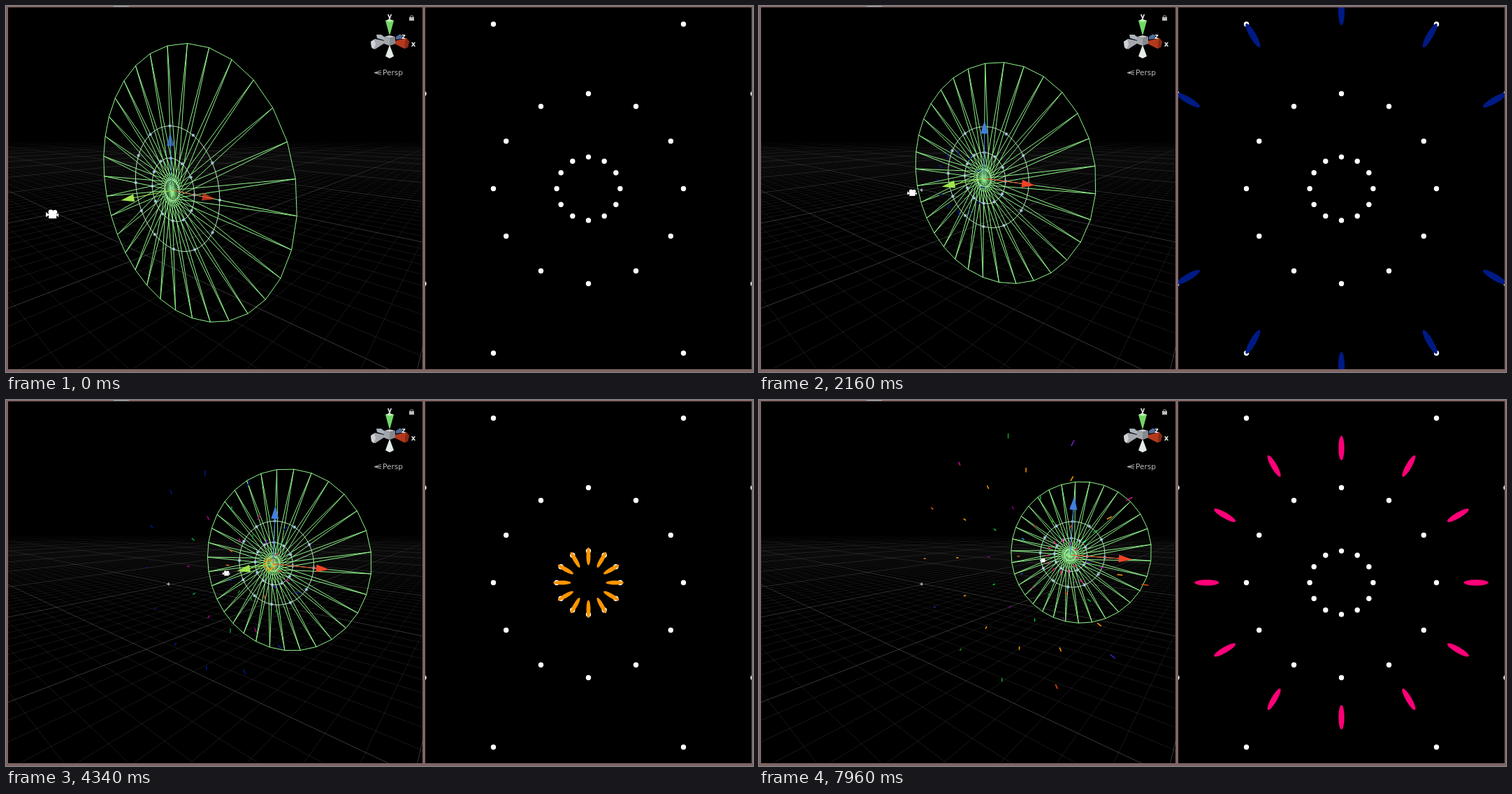
An HTML page with a canvas that plays this animation: 1069 by 524 pixels, repeating every 8000 ms.

```html
<!DOCTYPE html>
<html>
<head>
<meta charset="utf-8">
<style>
html, body { margin: 0; width: 100%; height: 100%; overflow: hidden; background: #000; }
canvas { display: block; }
</style>
</head>
<body>
<canvas id="stage" width="1069" height="524"></canvas>
<script>
const TAU = Math.PI * 2, LOOP = 8000;
const UNIT = 0.0374;          // one grid cell; the camera stands at distance 1 from the origin
const SPEED = 1.572e-4;       // depth travelled by the wheel per ms
const FOCAL = 415, YAW = 41.2 * Math.PI / 180, PITCH = 11.5 * Math.PI / 180;
const sinY = Math.sin(YAW), cosY = Math.cos(YAW), sinP = Math.sin(PITCH), cosP = Math.cos(PITCH);

const canvas = document.getElementById('stage');
const background = document.createElement('canvas');
background.width = canvas.width;
background.height = canvas.height;
let ctx;

// Bursts of twelve petals, one about every second; colours repeat around the ring.
const FIRST_BURST = 1090, BURST_GAP = 1004, BURST_LIFE = 5;
const BURSTS = [
  ['#001a85'],
  ['#a8007a', '#00a042'],
  ['#d85a10', '#e01890', '#7a20d0', '#14a020', '#d0109a', '#e05a10', '#f07010', '#2030c0', '#128a28', '#18a020', '#e85010', '#5020d0'],
  ['#ff9600'],
  ['#86008c', '#00c038'],
  ['#5a0cbc', '#1eff86', '#c84c0a', '#24c80a', '#b01024', '#00a8c8', '#cd6e00', '#184898', '#cd007a', '#0f8228', '#ff1a00', '#ff00b8'],
  ['#ff0078']
];

// World to screen: x right and nearer, y up, z away along the travel.
function project(x, y, z) {
  const h = z * cosY - x * sinY;
  const w = 1 + h * cosP - y * sinP;
  const right = -0.151 + x * cosY + z * sinY;
  const up = -0.0065 + y * cosP + h * sinP;
  return [300 + FOCAL * right / w, 261 - FOCAL * up / w, w];
}

const onRing = (radius, angle, z) => project(radius * Math.cos(angle), radius * Math.sin(angle), z);

function line(a, b) {
  ctx.moveTo(a[0], a[1]);
  ctx.lineTo(b[0], b[1]);
}

function stroke(color, width, build) {
  ctx.strokeStyle = color;
  ctx.lineWidth = width;
  ctx.beginPath();
  build();
  ctx.stroke();
}

function poly(color, ...points) {
  ctx.fillStyle = color;
  ctx.beginPath();
  points.forEach(p => ctx.lineTo(p[0], p[1]));
  ctx.fill();
}

function disc(color, x, y, radius) {
  ctx.fillStyle = color;
  ctx.beginPath();
  ctx.arc(x, y, radius, 0, TAU);
  ctx.fill();
}

function clipped(x, y, w, h, draw) {
  ctx.save();
  ctx.beginPath();
  ctx.rect(x, y, w, h);
  ctx.clip();
  draw();
  ctx.restore();
}

function drawGrid() {
  const step = 5 * UNIT, reach = 170;
  for (let i = -reach; i <= reach; i++) {
    const [strength, falloff] = i % 10 ? [0.19, 3.5] : [0.42, 2];
    for (let j = -34; j < 34; j++) {
      for (const alongX of [true, false]) {
        const at = k => alongX ? project(k * step, 0, i * UNIT) : project(i * UNIT, 0, k * step);
        const a = at(j), b = at(j + 1);
        const fade = 1 - (a[2] + b[2]) / 12;
        if (a[2] < 0.05 || b[2] < 0.05 || fade <= 0) continue;
        if (Math.max(a[0], b[0]) < 0 || Math.min(a[0], b[0]) > 600) continue;
        stroke(`rgba(150,150,150,${(strength * fade ** falloff).toFixed(4)})`, 1, () => line(a, b));
      }
    }
  }
}

function drawOrientation() {
  poly('#a9b4bd', [530, 41], [537, 41], [545, 47], [541, 49], [531, 46]);
  poly('#4f6b98', [558, 44], [564, 40], [567, 43], [566, 47], [558, 48]);
  poly('#73d765', [543, 21], [549, 19], [555, 21], [549.5, 41], [548.5, 41]);
  poly('#bdf0b4', [543, 21], [549, 19], [555, 21], [549, 23]);
  poly('#e4ece6', [548.5, 57], [549.5, 57], [555, 72], [549, 75], [543, 72]);
  poly('#a5a8ad', [522, 51], [528, 47], [542, 50], [542, 53], [528, 62], [523, 59]);
  poly('#d0d3d6', [522, 51], [527, 48], [529, 55], [526, 62], [523, 59]);
  poly('#b3391d', [556, 50], [573, 46], [577, 51], [575, 59], [570, 61], [556, 54]);
  poly('#8a2915', [573, 46], [577, 51], [575, 59], [571, 61], [571, 53]);
  poly('#c5c8cb', [541, 44], [549, 42], [557, 44], [549, 46]);
  poly('#a2a5a9', [541, 44], [549, 46], [549, 57], [541, 54]);
  poly('#85898e', [549, 46], [557, 44], [557, 54], [549, 57]);

  ctx.fillStyle = '#eee';
  ctx.textAlign = 'center';
  ctx.font = 'bold 10px "DejaVu Sans", sans-serif';
  ctx.fillText('y', 549, 18);
  ctx.fillText('z', 569, 47);
  ctx.fillText('x', 583, 58);

  ctx.fillStyle = '#bbb';
  ctx.font = '10.5px "DejaVu Sans", sans-serif';
  ctx.fillText('Persp', 553.5, 99);
  stroke('#aaa', 1, () => {
    line([537, 92.5], [527, 95.5]);
    line([527, 95.5], [537, 98.5]);
    line([528, 95.5], [537, 95.5]);
  });

  ctx.fillRect(577, 16, 7, 5);
  stroke('#aaa', 1, () => ctx.arc(580.5, 16, 2.3, Math.PI, TAU));
}

function drawBackground() {
  ctx = background.getContext('2d');
  ctx.fillStyle = '#806464';
  ctx.fillRect(0, 0, 1069, 524);
  ctx.fillStyle = '#8fb0b4';
  ctx.fillRect(154, 0, 22, 1);
  ctx.fillStyle = '#000';
  ctx.fillRect(3, 2, 593, 518);
  ctx.fillRect(600, 2, 467, 518);
  clipped(3, 2, 593, 518, () => {
    drawGrid();
    drawOrientation();
  });
  clipped(600, 2, 467, 518, () => {
    for (const radius of [45.4, 136, 272]) {
      for (let k = 0; k < 12; k++) {
        const a = k * TAU / 12;
        disc('#fff', 833.5 + radius * Math.cos(a), 261.5 + radius * Math.sin(a), 3.7);
      }
    }
  });
}

function eachBurst(t, draw) {
  BURSTS.forEach((colors, n) => {
    const start = FIRST_BURST + n * BURST_GAP, age = (t - start) / 1000;
    if (age < 0 || age > BURST_LIFE) return;
    for (let k = 0; k < 12; k++) draw(colors[k % colors.length], k * TAU / 12, age, start * SPEED);
  });
}

function drawWheel(z) {
  const count = 32, rim = 0.462, hub = 0.9 * UNIT;
  const angle = i => i * TAU / count;
  stroke('#90f48b', 1, () => {
    for (let i = 0; i < count; i++) {
      const tip = onRing(rim, angle(i), z);
      line(tip, onRing(rim, angle(i + 1), z));
      line(tip, onRing(hub, angle(i), z));
      line(tip, onRing(hub, angle(i - 5), z));
      line(onRing(hub, angle(i), z), project(0, 0, z));
    }
  });
  for (const radius of [UNIT, 2.95 * UNIT, 5.8 * UNIT]) {
    stroke('#b4e6b8', 1, () => {
      for (let i = 0; i < 48; i++) line(onRing(radius, i * TAU / 48, z), onRing(radius, (i + 1) * TAU / 48, z));
    });
    if (radius === UNIT) continue;
    for (let k = 0; k < 12; k++) {
      const [x, y] = onRing(radius, k * TAU / 12, z);
      disc('rgba(150,185,215,.75)', x, y, 2.4);
      disc('#d5e8ee', x, y, 1);
    }
  }
}

function drawHandle(from, to, color, alpha) {
  const dx = to[0] - from[0], dy = to[1] - from[1], length = Math.hypot(dx, dy);
  const ux = dx / length, uy = dy / length;
  const at = (along, across) => [to[0] + ux * along - uy * across, to[1] + uy * along + ux * across];
  ctx.globalAlpha = alpha;
  stroke(color, 1, () => line(from, to));
  poly(color, at(10, 0), at(-9, 5.5), at(-9, -5.5));
  ctx.globalAlpha = 1;
}

function drawHandles(t, z) {
  const center = project(0, 0, z), size = 0.172 * center[2];
  const bright = Math.min(1, 0.72 + t / 7000);
  const greenAlpha = Math.max(0, Math.min(1, 1 - (t - 4400) / 2300));
  drawHandle(center, project(0, 0, z - size), '#9fe64e', greenAlpha);
  drawHandle(center, project(size, 0, z), '#ee4424', bright);
  drawHandle(center, project(0, size, z), '#427fdd', bright);
}

function drawCameraIcon(z) {
  const [x, y, w] = project(0, 0, z - 0.384);
  ctx.save();
  ctx.translate(x, y);
  ctx.scale(0.72 / w, 0.72 / w);
  ctx.fillStyle = '#fff';
  ctx.fillRect(-5, -2, 11, 8);
  disc('#fff', -2, -3, 3.6);
  disc('#fff', 4, -3, 3.2);
  poly('#fff', [-4, 1], [-9, -3], [-9, 4]);
  poly('#fff', [5, 1], [9, -1], [9, 4]);
  ctx.restore();
}

function drawScene(t) {
  const z = t * SPEED;
  if (t > 1900) {
    stroke('#d8d4ee', 1, () => {
      line([233, 261], [233, 266]);
      line([230, 263.5], [234, 263.5]);
    });
  }
  drawWheel(z);
  eachBurst(t, (color, angle, age, depth) => {
    const radius = 0.118 * age;
    stroke(color, 1.5, () => line(onRing(radius - 0.01, angle, depth), onRing(radius + 0.01, angle, depth)));
  });
  drawHandles(t, z);
  drawCameraIcon(z);
}

function drawPetals(t) {
  eachBurst(t, (color, angle, age) => {
    const distance = 10 - 4.1 * age;
    if (distance < 3.5) return;
    const radius = 1488 * age / distance;
    ctx.fillStyle = color;
    ctx.beginPath();
    ctx.ellipse(833.5 + radius * Math.cos(angle), 261.5 - radius * Math.sin(angle),
      115 / distance, 27 / distance, -angle, 0, TAU);
    ctx.fill();
  });
}

function render(now) {
  // The picture advances in steps; the margin absorbs their rounding to 10 ms.
  const time = now % LOOP, step = 77.2, margin = 9;
  const t = time < 240 ? 0 : 240 + Math.floor((time - 240 + margin) / step) * step;
  ctx.drawImage(background, 0, 0);
  clipped(3, 2, 593, 518, () => drawScene(t));
  clipped(600, 2, 467, 518, () => drawPetals(t));
}

drawBackground();
ctx = canvas.getContext('2d');
let began;
function tick(now) {
  began ??= now;
  render(now - began);
  requestAnimationFrame(tick);
}
requestAnimationFrame(tick);
</script>
</body>
</html>
```
